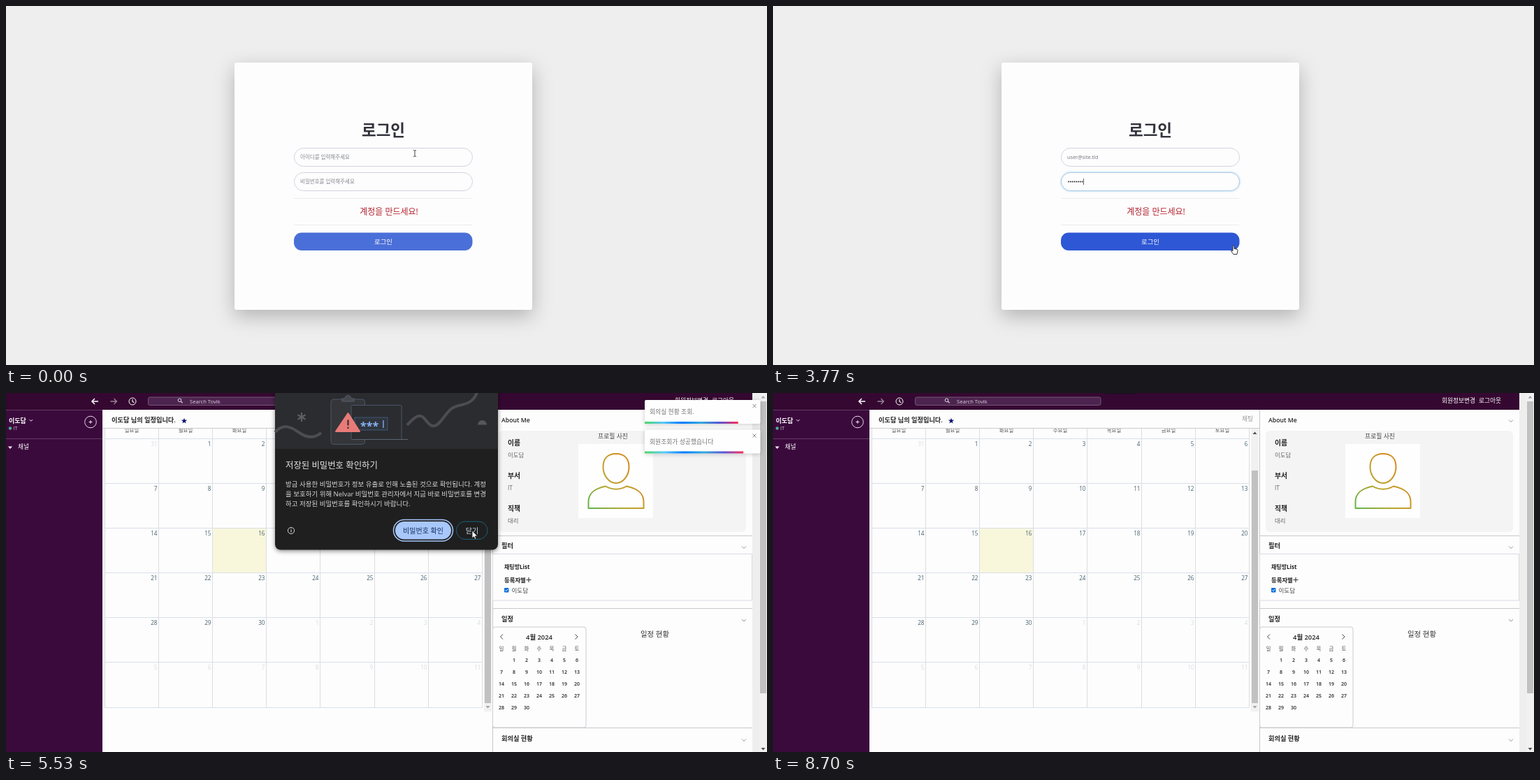
Write an HTML page that moves like this. It is 1089 px wide and 514 px high and loops after 8730 ms.

```html
<!DOCTYPE html>
<html lang="ko">
<head>
<meta charset="utf-8">
<style>
html, body { margin: 0; width: 100%; height: 100%; overflow: hidden; background: #eee; }
svg { display: block; width: 100vw; height: 100vh; }
text { font-family: 'Open Sans', 'Noto Sans CJK KR', 'Noto Sans CJK', sans-serif; white-space: pre; }
</style>
</head>
<body>
<svg id="stage" viewBox="0 0 1089 514"></svg>
<script>
const LOOP = 8730, PAGE = 4080, LOADED = 4560, POPUP = [4680, 5540];
const EMAIL = 'user@site.tld', PERSON = '이도담';
const WEEK = [...'일월화수목금토'];
const range = n => [...Array(n).keys()];

const attrs = o => Object.entries(o).map(([k, v]) => ` ${k}="${v}"`).join('');
const text = (x, y, size, str, fill = '#333', o = {}) =>
  `<text x="${x}" y="${y}" font-size="${size}" fill="${fill}"${attrs(o)}>${str}</text>`;
const rect = (x, y, w, h, fill, o = {}) =>
  `<rect x="${x}" y="${y}" width="${w}" height="${h}" fill="${fill}"${attrs(o)}/>`;
const path = (d, stroke, width = 1, fill = 'none', o = {}) =>
  `<path d="${d}" fill="${fill}" stroke="${stroke}" stroke-width="${width}"${attrs(o)}/>`;
const circle = (x, y, r, fill, stroke = 'none') =>
  `<circle cx="${x}" cy="${y}" r="${r}" fill="${fill}" stroke="${stroke}"/>`;
const group = (id, ...parts) => `<g id="${id}">${parts.flat().join('')}</g>`;
const mid = { 'text-anchor': 'middle' }, end = { 'text-anchor': 'end' };
const semi = { 'font-weight': 600 }, bold = { 'font-weight': 700 };

const field = (id, y, hint) => group(id,
  rect(412.5, y, 255, 26, '#fdfdfd', { rx: 13, stroke: '#d1d3e2', class: 'box' }),
  text(421, y + 15.5, 7.5, hint, '#85878f', { class: 'hint' }));

const login = () => group('login',
  rect(0, 0, 1089, 514, '#eeeeee'),
  rect(327, 81, 426, 354, '#fdfdfd', { rx: 3, style: 'filter:drop-shadow(0 9px 14px rgba(0,0,0,.25))' }),
  text(540, 186, 22.5, '로그인', '#32323c', { ...mid, ...bold }),
  field('user', 203.5, '아이디를 입력해주세요'),
  field('pass', 238.5, '비밀번호를 입력해주세요'),
  text(421, 219, 7.3, '', '#6e707e', { id: 'typed' }),
  path('', '#333', 2, 'none', { id: 'dots', 'stroke-dasharray': '0 2.8', 'stroke-linecap': 'round' }),
  rect(0, 0, .8, 9, '#333', { id: 'caret' }),
  path('M412 275.5H667M412 313.5H667', '#ebebf0'),
  text(548, 298.5, 12, '계정을 만드세요!', '#b3202c', mid),
  rect(412, 324.5, 255.5, 25.5, '#4b6fd8', { rx: 11, id: 'button' }),
  text(540, 340.5, 9.4, '로그인', '#fff', mid));

const chevron = y => path(`M1053 ${y}l3 3 3-3`, '#8a8a8a', .9);

const topBar = () => [
  rect(0, 0, 1068, 24, '#350831'),
  rect(203.5, 6, 265.5, 11.5, '#4d2450', { rx: 2.5, stroke: '#765677' }),
  text(263, 15, 7.6, 'Search Tovik', '#dcd2dc'),
  text(957, 14, 8.7, '회원정보변경', '#fff'),
  text(1010, 14, 8.7, '로그아웃', '#fff')];

const sidebar = () => [
  rect(0, 24, 138, 490, '#3b0a3d'),
  path('M0 24.5H138M0 65.5H138', '#5f3b61'),
  text(4, 42.5, 9, PERSON, '#fff', bold),
  text(10.5, 53, 7.2, 'IT', '#cfc3cf'),
  circle(121, 41.5, 8.3, 'none', '#e3dce3'),
  path('M118.5 41.5h5M121 39v5', '#fff', .9),
  text(17, 80, 8.7, '채널', '#fff')];

const info = (y, label, value) =>
  text(718, y, 9.8, label, '#222', bold) + text(718, y + 16.5, 8.4, value, '#666');

const picker = () => [
  rect(696.5, 335, 133.5, 144, '#fdfdfd', { rx: 3, stroke: '#ccccd2' }),
  path('M711 345.5l-3.5 3.5 3.5 3.5M814.5 345.5l3.5 3.5-3.5 3.5', '#444'),
  text(763, 352.5, 9.4, '4월 2024', '#222', { ...mid, ...semi }),
  WEEK.map((d, i) => text(709 + 18 * i, 369, 7.5, d, '#555', mid)),
  range(30).map(i => text(709 + 18 * ((i + 1) % 7), 385 + 17 * Math.floor((i + 1) / 7), 7, i + 1, '#222', { ...mid, ...semi }))];

const panel = () => [
  rect(705, 54, 354, 145, '#f4f4f5', { rx: 6 }),
  path('M696.5 24V514', '#c8c8cc'),
  path('M696 204.5H1068M696 308.5H1068M696 479.5H1068', '#c8c8cc'),
  text(709, 42, 8.7, 'About Me', '#222', semi),
  info(75, '이름', PERSON), info(122, '부서', 'IT'), info(169, '직책', '대리'),
  text(868.5, 64.5, 8.8, '프로필 사진', '#444', mid),
  text(709, 222, 9.2, '필터', '#222', semi),
  rect(696.5, 230.5, 371, 66.5, '#fdfdfd', { stroke: '#d9d9e4' }),
  text(713, 251.5, 8, '채팅방List', '#222', bold),
  text(713, 270.5, 8.4, '등록자별', '#222', semi),
  rect(713, 279, 6.5, 6.5, '#0b6fdc', { rx: 1 }),
  path('M714.4 282.2l1.4 1.5 2.4-3', '#fff', .9),
  text(723.5, 286, 8.5, PERSON, '#444'),
  text(709, 326.5, 9.2, '일정', '#222', semi),
  picker(),
  text(928.5, 348.5, 10.4, '일정 현황', '#333', mid),
  text(709, 498, 9.2, '회의실 현황', '#222', semi)];

const brokenImage = () => group('broken',
  rect(819.5, 73, 7.5, 9, '#e9f1f7', { stroke: '#9aa5ad', 'stroke-width': .8 }),
  path('M820 81l3-4 3.5 4z', 'none', 0, '#63a653'),
  text(827.5, 81.5, 7.9, 'Profile Image', '#666'));

const pageScroll = () => [
  rect(1068, 0, 10, 514, '#eeeeee'),
  rect(1078, 0, 11, 514, '#f1f1f1'),
  rect(1079, 12, 9, 471, '#c1c1c1', { id: 'thumb' }),
  path('M1080.5 7.5l3-3.5 3 3.5z', 'none', 0, '#a3a3a3'),
  path('M1080.5 508l3 3.5 3-3.5z', 'none', 0, '#505050')];

const colX = i => Math.round(141 + 77.1 * i) + .5;
const rowY = i => (i < 6 ? 65 + 64 * i : 450) + .5;

const calendar = () => [
  rect(296, 194, 76, 63, '#f8f7dc'),
  path(range(8).map(i => `M${colX(i)} 51V450.5`).join(''), '#dddde2'),
  path(range(7).map(i => `M141 ${rowY(i)}H681`).join(''), '#d9dfe9'),
  WEEK.map((d, i) => text(colX(i) + 38.5, 56, 7.4, d + '요일', '#555', mid)),
  range(42).map(i => {
    const day = (i + 30) % 31 + 1, inside = i > 0 && i < 31;
    const shown = i === 0 ? 31 : inside ? i : i - 30;
    return text(colX(i % 7 + 1) - 2, rowY(Math.floor(i / 7)) + 10.5, 8.1, shown, inside ? '#43606f' : '#d6dbe2', end);
  }),
  rect(138, 24, 557, 26, '#fdfdfd'),
  rect(684, 51, 11, 405, '#f1f1f1'),
  rect(685, 111, 9, 333, '#c1c1c1'),
  path('M686.5 59l3-3.5 3 3.5z', 'none', 0, '#505050'),
  path('M686.5 448l3 3.5 3-3.5z', 'none', 0, '#a3a3a3')];

const star = () => 'M' + range(10).map(i => {
  const r = i % 2 ? 1.8 : 4.3, a = Math.PI * (i / 5 - .5);
  return `${255 + r * Math.cos(a)} ${40 + r * Math.sin(a)}`;
}).join('L') + 'z';

const loaded = () => group('loaded',
  calendar(),
  path(star(), 'none', 0, '#0b1270'),
  path('M132 12h-9M127 8l-4 4 4 4', '#fff', 1.5),
  path('M149.500 12h9M154.500 8l4 4-4 4', '#9b849b', 1.3),
  circle(181, 12, 5, 'none', '#fff'),
  path('M181 9v3.300l2.500 1.500', '#fff', 1.1),
  circle(248.5, 10.3, 2.3, 'none', '#e6dfe6'),
  path('M250.300 12l2.300 2.300', '#e6dfe6', 1.1),
  path('M33.500 38l2.300 2.300 2.300-2.300', '#fff', .9),
  circle(6, 50.5, 2.2, '#4fae8d'),
  path('M3 76.500h6l-3 3.500z', 'none', 0, '#fff'),
  [38.5, 219.5, 324, 495.5].map(chevron),
  path('M744.500 267.500h7M748 264v7', '#333', 1.1),
  rect(819, 73, 107, 106, '#fefefe'),
  path('M873 87C886 87 891.500 95 891.500 106S884 129 873 129 854.500 117 854.500 106 860 87 873 87z' +
    'M833.500 165V156C833.500 144 841 137 858 133.500Q873 142 888 133.500C905 137 912.500 144 912.500 156V165z',
    'url(#warm)', 2, 'none', { 'stroke-linejoin': 'round' }));

const popup = () => group('popup',
  rect(385, -10, 319, 234.5, '#1f1f20', { rx: 8, style: 'filter:drop-shadow(0 2px 3px rgba(0,0,0,.45))' }),
  rect(385, 0, 319, 80, '#2b2c2f'),
  path('M385 56C398 42 410 50 420 57S440 66 451 57M574 46C588 30 594 30 600 38S612 54 624 38 638 20 652 17 670 8 674 0', '#4b4d51', 4),
  path('M423 28v13M417.500 31.200l11 6.500M428.500 31.200l-11 6.500', '#5c5e62', 2.2),
  path('M675 45.500a6.500 6.500 0 0 1 13 0z', 'none', 0, '#55575b'),
  rect(465, 9, 48.5, 64.5, '#34363a', { rx: 4, stroke: '#4b5866' }),
  path('M481 12V8h4a4.500 4.500 0 0 1 9 0h4v4z', '#56616e', 1, '#44474c'),
  rect(494, 17.5, 72, 49, '#2a2c30', { rx: 1, stroke: '#4b5866' }),
  path('M497 66.500h78', '#5a6672'),
  rect(499, 35, 47, 18, '#30353d', { stroke: '#3f5878' }),
  text(507, 53, 16, '***', '#8ab4f8', bold),
  path('M540 39v11', '#8ab4f8', 1.3),
  path('M489.500 29L506 55H472z', '#e87b78', 2, '#e87b78', { 'stroke-linejoin': 'round' }),
  path('M489.500 38.500v8M489.500 48.700v2.200', '#27282a', 2),
  text(400, 108, 12.4, '저장된 비밀번호 확인하기', '#e6e6e6'),
  ['방금 사용한 비밀번호가 정보 유출로 인해 노출된 것으로 확인됩니다. 계정',
   '을 보호하기 위해 Nelvar 비밀번호 관리자에서 지금 바로 비밀번호를 변경',
   '하고 저장된 비밀번호를 확인하시기 바랍니다.']
    .map((line, i) => text(400, 134 + 14.2 * i, 9.5, line, '#d8d8d8')),
  circle(408, 197, 4.6, 'none', '#d5d5d5'),
  path('M408 196v3.500M408 194v1', '#d5d5d5', 1.1),
  rect(554.5, 181.5, 85, 30.5, 'none', { rx: 15.2, stroke: '#a8c7fa', 'stroke-width': 1.5 }),
  rect(557, 184, 80, 25.5, '#a8c7fa', { rx: 12.7 }),
  text(597, 200.5, 10, '비밀번호 확인', '#12305f', mid),
  rect(644.5, 184, 44.5, 25.5, 'none', { rx: 12.7, stroke: '#1b6279' }),
  text(667, 200.5, 10, '닫기', '#cfe3f3', mid));

const toast = (id, y, message) => group(id,
  rect(914, y, 165.5, 34, '#fefefe', { rx: 2, style: 'filter:drop-shadow(0 1px 3px rgba(0,0,0,.2))' }),
  text(921, y + 20, 8.8, message, '#757575'),
  path(`M1068.500 ${y + 6}l5 5m0-5l-5 5`, '#888'),
  rect(914, y + 31, 165.5, 3, 'url(#rainbow)', { class: 'bar' }));

const gradient = (id, colors, dir) => `<linearGradient id="${id}"${attrs(dir)}>` +
  colors.map((c, i) => `<stop offset="${i / (colors.length - 1)}" stop-color="${c}"/>`).join('') + '</linearGradient>';

const cursors = () => group('cursor',
  path('M0 0V11L2.500 8.700 4.200 12.300 5.900 11.500 4.300 8H7.600z', '#222', .9, '#fff', { id: 'arrow' }),
  path('M-2-4.500Q0-4.500 0-3.500Q0-4.500 2-4.500M0-3.500V3.500M-2 4.500Q0 4.500 0 3.500Q0 4.500 2 4.500', '#444', 1, 'none', { id: 'beam' }),
  path('M-1 6.500V1A1 1 0 0 1 1 1V4.500L5 5.300Q6 5.600 6 6.700L5 12.500H0L-3.500 8Q-3.300 6-1 7.800z', '#222', .9, '#fff', { id: 'hand' }));

const $ = id => document.getElementById(id);
$('stage').innerHTML = '<defs>' +
  gradient('warm', ['#62b548', '#b9a530', '#d58b1e'], { gradientUnits: 'userSpaceOnUse', x1: 833, y1: 165, x2: 900, y2: 110 }) +
  gradient('rainbow', ['#4cd964', '#5ac8fa', '#007aff', '#34aadc', '#5856d6', '#ff2d55'], {}) + '</defs>' +
  login() +
  group('page', rect(0, 0, 1089, 514, '#fdfdfd'), topBar(), sidebar(), panel(), brokenImage(), loaded(),
    path('M138 50.500H696', '#cbcbd0'),
    text(151, 42, 9.2, PERSON + ' 님의 일정입니다.', '#222', semi),
    text(671, 40, 8.7, '채팅', '#999'),
    pageScroll(), rect(474, 0, 46, 1, '#15101a', { id: 'strip' })) +
  popup() + toast('toast1', 10, '회의실 현황 조회.') + toast('toast2', 52.5, '회원조회가 성공했습니다') + cursors();

const show = (id, on) => $(id).setAttribute('visibility', on ? 'visible' : 'hidden');
const display = (id, on) => { $(id).style.display = on ? '' : 'none'; };
const clamp = v => Math.max(0, Math.min(1, v));
const ease = v => v * v * (3 - 2 * v);

// Interpolates rows of [time, ...values].
function track(rows, t, curve = v => v) {
  const i = rows.findIndex(r => r[0] > t);
  if (i < 0) return rows[rows.length - 1].slice(1);
  if (i === 0) return rows[0].slice(1);
  const a = rows[i - 1], b = rows[i], u = curve((t - a[0]) / (b[0] - a[0]));
  return a.slice(1).map((v, k) => v + (b[k + 1] - v) * u);
}

const MOUSE = [[0, 585, 211], [420, 585, 211], [900, 709, 226], [3330, 709, 226], [3700, 659, 343],
  [3900, 659, 343], [4250, 782, 260], [4420, 782, 260], [4800, 831, 164], [5300, 667, 197],
  [5600, 667, 197], [5850, 640, -20]];
const ENTER = [[0, 3000], [.6, -25], [.75, 10], [.9, -5], [1, 0]];
const LEAVE = [[0, 0], [.2, -20], [1, 2000]];

function drawField(id, focused, empty) {
  const box = $(id).querySelector('.box');
  box.setAttribute('stroke', focused ? '#a9c9e6' : '#d1d3e2');
  box.style.filter = focused ? 'drop-shadow(0 0 1.5px #a5d0ee)' : '';
  $(id).querySelector('.hint').style.display = empty ? '' : 'none';
}

function drawLogin(t, x, y) {
  const typed = Math.max(0, Math.min(13, Math.floor((t - 1040) / 105)));
  const dots = Math.max(0, Math.min(8, Math.floor((t - 2640) / 82)));
  const inUser = t > 280 && t < 2600, inPass = t >= 2600;
  drawField('user', inUser, !typed);
  drawField('pass', inPass, !dots);
  $('typed').textContent = EMAIL.slice(0, typed);
  $('dots').setAttribute('d', dots ? `M423 251.500h${2.8 * (dots - 1) + .1}` : '');
  const lastKey = inPass ? (dots < 8 ? t : 3296) : typed === 0 ? 280 : typed < 13 ? t : 2405;
  show('caret', (inUser || inPass) && (t - lastKey) % 1060 < 530);
  $('caret').setAttribute('x', inPass ? 421.5 + 2.8 * dots : 421.3 + (typed ? $('typed').getComputedTextLength() : 0));
  $('caret').setAttribute('y', inPass ? 247 : 212);
  const hover = x < 667 && y > 324;
  $('button').setAttribute('fill', hover ? '#2e57d5' : '#4b6fd8');
  return hover ? 'hand' : x < 667 && y < 229 ? 'beam' : 'arrow';
}

function drawToast(id, t, enter, run) {
  const leave = run + 3000;
  const [dx] = t < leave ? track(ENTER, (t - enter) / 500) : track(LEAVE, (t - leave) / 750);
  display(id, t >= enter && dx < 200);
  $(id).setAttribute('transform', `translate(${dx})`);
  $(id).querySelector('.bar').setAttribute('width', 165.5 * (1 - clamp((t - run) / 3000)));
}

function draw(t) {
  const [x, y] = track(MOUSE, t, ease), onPage = t >= PAGE;
  display('login', !onPage);
  display('page', onPage);
  const kind = onPage ? 'arrow' : drawLogin(t, x, y);
  display('broken', t < LOADED);
  display('loaded', t >= LOADED);
  $('thumb').setAttribute('height', t < LOADED ? 471 : 418);
  display('popup', t >= POPUP[0] && t < POPUP[1]);
  display('strip', t > 8640);
  drawToast('toast1', t, 4382, 4955);
  drawToast('toast2', t, 4392, 5090);
  for (const id of ['arrow', 'beam', 'hand']) display(id, id === kind);
  $('cursor').setAttribute('transform', `translate(${x} ${y})`);
}

(function frame() {
  draw(performance.now() % LOOP);
  requestAnimationFrame(frame);
})();
</script>
</body>
</html>
```
